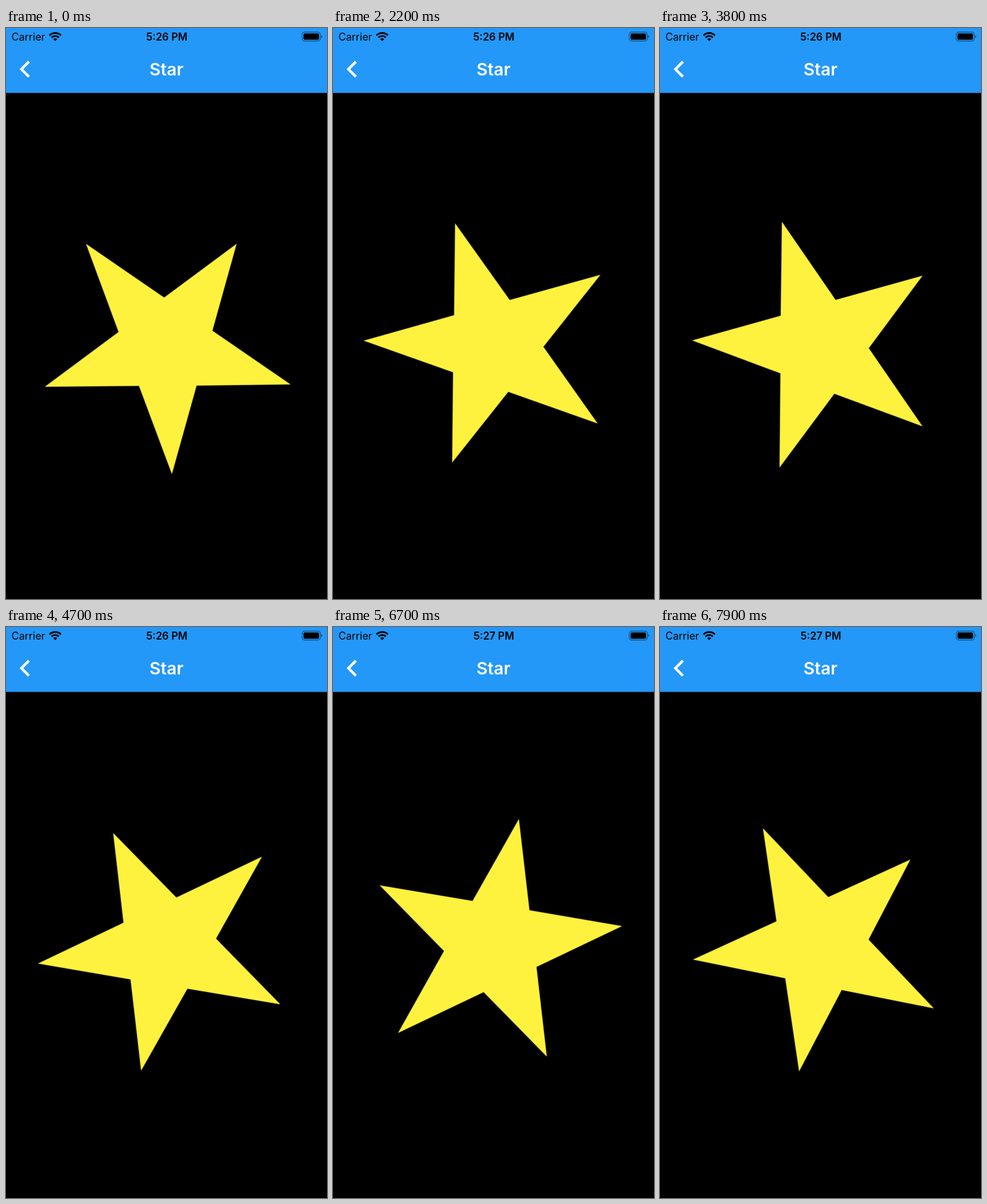
Animation of 561 by 998 pixels, one loop 8000 ms. Source, as an HTML page:

```html
<!DOCTYPE html>
<html lang="en">
<head>
<meta charset="utf-8">
<title>Star</title>
<style>
  html, body { margin: 0; width: 100%; height: 100%; overflow: hidden; background: #000; }
  svg { display: block; width: 561px; height: 998px; }
  text { font-family: Inter, Roboto, sans-serif; }
  .status { font-size: 18px; }
  .clock { font-weight: 600; text-anchor: middle; }
  .title { font-size: 30px; font-weight: 600; text-anchor: middle; fill: #fff; }
</style>
</head>
<body>
<svg viewBox="0 0 561 998">
  <rect width="561" height="998" fill="#000"/>
  <rect width="561" height="113.5" fill="#2398f8"/>

  <text class="status" x="9.5" y="22" textLength="auto">Carrier</text>
  <g transform="translate(86 23)">
    <clipPath id="fan"><path d="M0 0L-17 -17H17Z"/></clipPath>
    <g clip-path="url(#fan)" fill="none" stroke="#000" stroke-width="3">
      <circle r="14.2"/>
      <circle r="9"/>
      <circle r="5" fill="#000" stroke="none"/>
    </g>
  </g>
  <text class="status clock" id="before" x="281" y="22">5:26 PM</text>
  <text class="status clock" id="after" x="281" y="22" opacity="0">5:27 PM</text>
  <g>
    <rect x="517.7" y="7.2" width="31.6" height="15.6" rx="4" fill="none" stroke="#000" stroke-opacity=".45" stroke-width="1.4"/>
    <rect x="520" y="9.5" width="27" height="11" rx="2.2"/>
    <path d="M550.8 12.5q1.8 .8 1.8 2.5t-1.8 2.5z" fill-opacity=".5"/>
  </g>

  <path d="M40 58.8L27 72L40 85.2" fill="none" stroke="#fff" stroke-width="4.6"/>
  <text class="title" x="280.5" y="82.5">Star</text>

  <g transform="translate(280.5 555.5)">
    <polygon id="star" fill="#fff23e"/>
  </g>
</svg>
<script>
  const LOOP = 8000, STEP = 100, TURN = -9, MINUTE_AT = 6200;
  const $ = id => document.getElementById(id);

  // Right half of the star from the top tip down; the left half mirrors it.
  const half = [[0, -216.5], [51.2, -67.3], [217, -67.3], [82.8, 27.4], [134.8, 179.6], [0, 85]];
  const mirror = half.slice(1, -1).reverse().map(([x, y]) => [-x, y]);
  $('star').setAttribute('points', [...half, ...mirror].join(' '));

  const loop = (el, frames) =>
    el.animate(frames, { duration: LOOP, iterations: Infinity, delay: -1 });

  const steps = LOOP / STEP - 1;
  const first = 28.5;
  const rotate = deg => `rotate(${deg}deg)`;
  loop($('star'), [
    { transform: rotate(34.5), offset: 0, easing: 'steps(1, end)' },
    { transform: rotate(first), offset: STEP / LOOP, easing: `steps(${steps}, end)` },
    { transform: rotate(first + TURN * steps), offset: 1 }
  ]);

  const swap = (el, from, to) => loop(el, [
    { opacity: from, offset: 0, easing: 'steps(1, end)' },
    { opacity: to, offset: MINUTE_AT / LOOP },
    { opacity: to, offset: 1 }
  ]);
  swap($('before'), 1, 0);
  swap($('after'), 0, 1);
</script>
</body>
</html>
```
